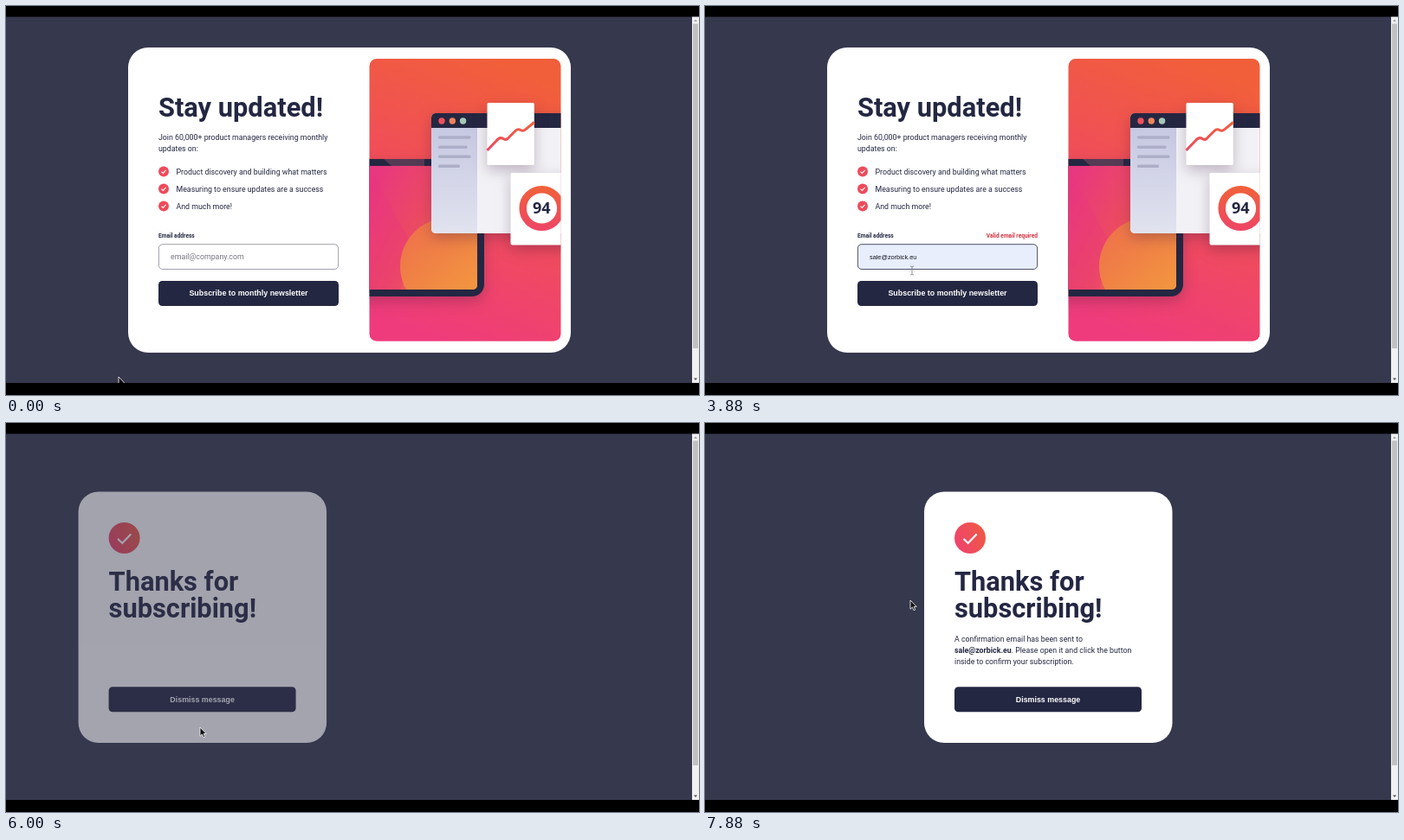
Recreate the animation shown at these times as an HTML page. Size 800 px wide and 450 px high, loop 8 s.

```html
<!DOCTYPE html>
<html lang="en">
<head>
<meta charset="utf-8">
<title>Newsletter sign-up</title>
<style>
  html, body { margin: 0; width: 100%; height: 100%; overflow: hidden; background: #000; }
  svg { display: block; width: 800px; height: 450px; }
  text { font: 8.8px Roboto, sans-serif; fill: #242742; white-space: pre; }
  .title { font-size: 30.8px; font-weight: 700; }
  .bold { font-weight: 700; }
  .small { font-size: 6.6px; font-weight: 700; }
  .button { font: 700 8.9px "Liberation Sans", Arial, sans-serif; fill: #fff; text-anchor: middle; }
  .preview { font: 7.33px "Liberation Sans", Arial, sans-serif; }
  .soft { filter: drop-shadow(0 6px 8px rgb(60 20 60 / .28)); }
  #glow { filter: blur(8px); }
</style>
</head>
<body>
<svg viewBox="0 0 800 450">
  <defs>
    <clipPath id="page"><path d="M0 12.5H800V436H0Z"/></clipPath>
    <clipPath id="art"><rect x="419.5" y="61" width="221" height="326.7" rx="8.5"/></clipPath>
    <clipPath id="screen"><path d="M419 185H544V323a5 5 0 0 1-5 5H419Z"/></clipPath>
    <linearGradient id="hot" x1=".65" y1="0" x2=".35" y2="1">
      <stop stop-color="#f15f3a"/><stop offset="1" stop-color="#ef3b7c"/>
    </linearGradient>
    <linearGradient id="down" x2="0" y2="1">
      <stop stop-color="#f1603f"/><stop offset="1" stop-color="#f03f78"/>
    </linearGradient>
    <linearGradient id="badge" x1="0" y1=".7" x2="1" y2=".3">
      <stop stop-color="#f0426f"/><stop offset="1" stop-color="#ee5a44"/>
    </linearGradient>
    <linearGradient id="ring" x2="0" y2="1">
      <stop stop-color="#f0603c"/><stop offset="1" stop-color="#ee4763"/>
    </linearGradient>
    <linearGradient id="glass" x1="0" y1=".2" x2="1" y2=".8">
      <stop stop-color="#e8387f"/><stop offset=".45" stop-color="#ec4a62"/><stop offset="1" stop-color="#f0853f"/>
    </linearGradient>
    <linearGradient id="sun" x1="0" y1="0" x2=".7" y2=".8">
      <stop stop-color="#ee6c4c"/><stop offset="1" stop-color="#f2963f"/>
    </linearGradient>
    <linearGradient id="side" x2="0" y2="1">
      <stop stop-color="#c7c8e2"/><stop offset="1" stop-color="#e1e3ef"/>
    </linearGradient>
  </defs>

  <g clip-path="url(#page)">
    <path d="M0 12H800V437H0Z" fill="#36384e"/>

    <g id="form">
      <rect x="141" y="48" width="511" height="353" rx="23" fill="#fff"/>
      <text class="title" x="176" y="128">Stay updated!</text>
      <text x="176" y="155">Join 60,000+ product managers receiving monthly</text>
      <text x="176" y="168.2">updates on:</text>
      <g id="list"></g>
      <text class="small" x="176" y="268.3">Email address</text>
      <text class="small" id="error" x="384" y="268.3" text-anchor="end" style="fill:#d2323f">Valid email required</text>
      <rect id="input" x="176.4" y="275.7" width="207.2" height="28.8" rx="4.4"/>
      <text id="value" x="190" y="293.2"></text>
      <rect id="glow" x="176" y="328" width="208" height="29" rx="4.4" fill="#ff6257"/>
      <rect id="submit" x="176" y="318" width="208" height="29" rx="4.4"/>
      <text class="button" x="280" y="335.2">Subscribe to monthly newsletter</text>

      <g clip-path="url(#art)">
        <path d="M419 61H641V388H419Z" fill="url(#hot)"/>
        <rect class="soft" x="390" y="177" width="162" height="159" rx="14" fill="#242742"/>
        <path d="M436 177h47v8h-38Z" fill="#563b55"/>
        <g clip-path="url(#screen)">
          <path d="M419 185H544V328H419Z" fill="url(#glass)"/>
          <path d="M419 185l50 92-14 51h-36Z" fill="#e8357f" opacity=".35"/>
          <circle cx="511" cy="301" r="56" fill="url(#sun)"/>
        </g>
        <g class="soft">
          <rect x="491" y="124" width="160" height="139" rx="5" fill="#f2f2f6"/>
          <path d="M491 141H544V263H496a5 5 0 0 1-5-5Z" fill="url(#side)"/>
          <path d="M491 141V129a5 5 0 0 1 5-5H651V141Z" fill="#242742"/>
        </g>
        <circle cx="503" cy="133" r="3.7" fill="#ef4f5c"/>
        <circle cx="515.3" cy="133" r="3.7" fill="#ef835a"/>
        <circle cx="527.6" cy="133" r="3.7" fill="#a6c9b8"/>
        <path d="M500.5 152H535M500.5 163.2H531M500.5 174.2H535M500.5 185.2H522.5" stroke="#adaec8" stroke-width="3.4" stroke-linecap="round"/>
        <rect class="soft" x="555.5" y="112" width="54.3" height="72" rx="1.5" fill="#fff"/>
        <path d="M555.5 167L566 156q4-5 8-2.500t7-2l7-7q3-3 6-1t6-1l9.800-8" fill="none" stroke="url(#ring)" stroke-width="3"/>
        <rect class="soft" x="582.5" y="193" width="70" height="83.500" rx="2" fill="#fff"/>
        <circle cx="618.500" cy="234" r="21.800" fill="none" stroke="url(#ring)" stroke-width="8.500"/>
        <text x="618.300" y="240.200" text-anchor="middle" style="font:700 18px 'Open Sans',sans-serif">94</text>
      </g>
    </g>

    <g id="thanks">
      <rect x="253" y="79.500" width="286.500" height="290.500" rx="23" fill="#fff"/>
      <circle cx="306" cy="133" r="18" fill="url(#badge)"/>
      <path d="M298.500 134l5.200 5 10-10.500" fill="none" stroke="#fff" stroke-width="2.200"/>
      <text class="title" x="288" y="194">Thanks for</text>
      <text class="title" x="288" y="225">subscribing!</text>
      <g id="details">
        <text x="288" y="252.600">A confirmation email has been sent to</text>
        <text x="288" y="265.800"><tspan class="bold" id="recipient"></tspan>. Please open it and click the button</text>
        <text x="288" y="279">inside to confirm your subscription.</text>
      </g>
      <rect x="288" y="305.300" width="216" height="29" rx="4.400" fill="#242742"/>
      <text class="button" x="396" y="322.500">Dismiss message</text>
    </g>

    <path d="M792 12H800V437H792Z" fill="#f1f1f1"/>
    <path d="M793 20.500H799V396H793Z" fill="#c1c1c1"/>
    <path d="M794 18l2-2.500 2 2.500Z" fill="#a3a3a3"/>
    <path d="M794 430.500l2 2.500 2-2.500Z" fill="#505050"/>

    <g id="cursor">
      <path id="arrow" d="M0 0V10.300L2.400 8.100 4 11.700 5.700 11 4.200 7.500H7.200Z" fill="#111" stroke="#fff" stroke-width=".8"/>
      <path id="hand" d="M-1 1q1-1.500 2 0V4.500l3 .6q1.700.3 1.500 2L5 9.500 4.300 11H-.5L-3.500 7q0-1.500 1.300-1L-1 7Z" fill="#fff" stroke="#222" stroke-width=".8"/>
      <path id="beam" d="M-2-5Q0-5 0-4Q0-5 2-5M0-4V4M-2 5Q0 5 0 4Q0 5 2 5" fill="none" stroke="#777" stroke-width=".8"/>
    </g>
  </g>
</svg>
<script>
const $ = id => document.getElementById(id);
const clamp = p => Math.max(0, Math.min(1, p));
const set = (id, attrs) => { for (const key in attrs) $(id).setAttribute(key, attrs[key]); };
const show = (id, on) => { $(id).style.display = on ? '' : 'none'; };

const LOOP = 8000, STEP = 125;
const EMAIL = 'sale@zorbick.eu';
const SENT = 5875;

// Pointer path: time, x, y
const path = [
  [0, 130, 429], [875, 284, 334], [1250, 284, 334], [1375, 287, 363], [1500, 305, 355],
  [1750, 335, 325], [1875, 345, 296], [2000, 350, 292], [2500, 328, 261], [2625, 328, 261],
  [3000, 257, 288], [3125, 257, 288], [3875, 239, 306], [4250, 239, 306], [4375, 238, 299],
  [4625, 238, 299], [5000, 258, 338], [5500, 255, 335], [5750, 255, 335], [6250, 193, 369],
  [6500, 193, 369], [6875, 196, 370], [7375, 196, 370], [7875, 237, 205]
];

function pointer(t) {
  const next = path.findIndex(key => key[0] > t);
  if (next < 1) return path[next ? path.length - 1 : 0].slice(1);
  const [a, b] = [path[next - 1], path[next]];
  const p = (t - a[0]) / (b[0] - a[0]);
  return [a[1] + (b[1] - a[1]) * p, a[2] + (b[2] - a[2]) * p];
}

const inside = ([x, y], top, bottom) => x > 176 && x < 384 && y > top && y < bottom;
const overButton = t => inside(pointer(t), 318, 347);

['Product discovery and building what matters', 'Measuring to ensure updates are a success', 'And much more!']
  .forEach((item, i) => {
    $('list').innerHTML += `<g transform="translate(0 ${20 * i})">
      <circle cx="182" cy="191.5" r="6" fill="#ee4b5b"/>
      <path d="M179.5 191.700l1.800 1.700 3.300-3.500" fill="none" stroke="#fff" stroke-width="1.1"/>
      <text x="196.500" y="194.800">${item}</text></g>`;
  });
$('recipient').textContent = EMAIL;

function drawForm(t, hover) {
  const failed = t >= 1250, focused = t >= 3250, preview = t >= 3500, filled = t >= 4125;
  const p = clamp((t - 1125) / 375);
  set('error', {
    transform: `translate(${-60 * (1 - p) ** 1.82} 0)`,
    opacity: t < 5375 ? p : 0
  });
  set('input', {
    fill: preview ? '#e8eefc' : failed ? '#fde4e4' : '#fff',
    stroke: focused ? '#3d3f58' : failed ? '#d9727c' : '#9797a8',
    'stroke-width': .9
  });
  $('value').textContent = preview ? EMAIL : 'email@company.com';
  $('value').setAttribute('class', preview && !filled ? 'preview' : '');
  $('value').style.fill = preview ? '#15161f' : '#757580';
  set('submit', { fill: hover ? 'url(#down)' : '#242742' });
  set('glow', { opacity: hover ? .5 : 0 });
}

function drawThanks(t) {
  const p = clamp((t - SENT) / 500);
  set('thanks', {
    transform: `translate(${-286 * (1 - p) ** 1.82} 0)`,
    opacity: 1 - (1 - p) ** 2.7
  });
  set('details', { opacity: clamp((t - 6500) / 375) });
}

function draw(t) {
  const sent = t >= SENT;
  show('form', !sent);
  show('thanks', sent);
  drawForm(t, overButton(t) || overButton(t - STEP));
  drawThanks(t);

  const at = pointer(t);
  const shape = sent ? 'arrow' : overButton(t) ? 'hand' : inside(at, 258, 308) ? 'beam' : 'arrow';
  for (const id of ['arrow', 'hand', 'beam']) show(id, id === shape);
  set('cursor', { transform: `translate(${at})` });
}

function tick(now) {
  draw(Math.floor((now % LOOP) / STEP) * STEP);
  requestAnimationFrame(tick);
}
draw(0);
requestAnimationFrame(tick);
</script>
</body>
</html>
```
